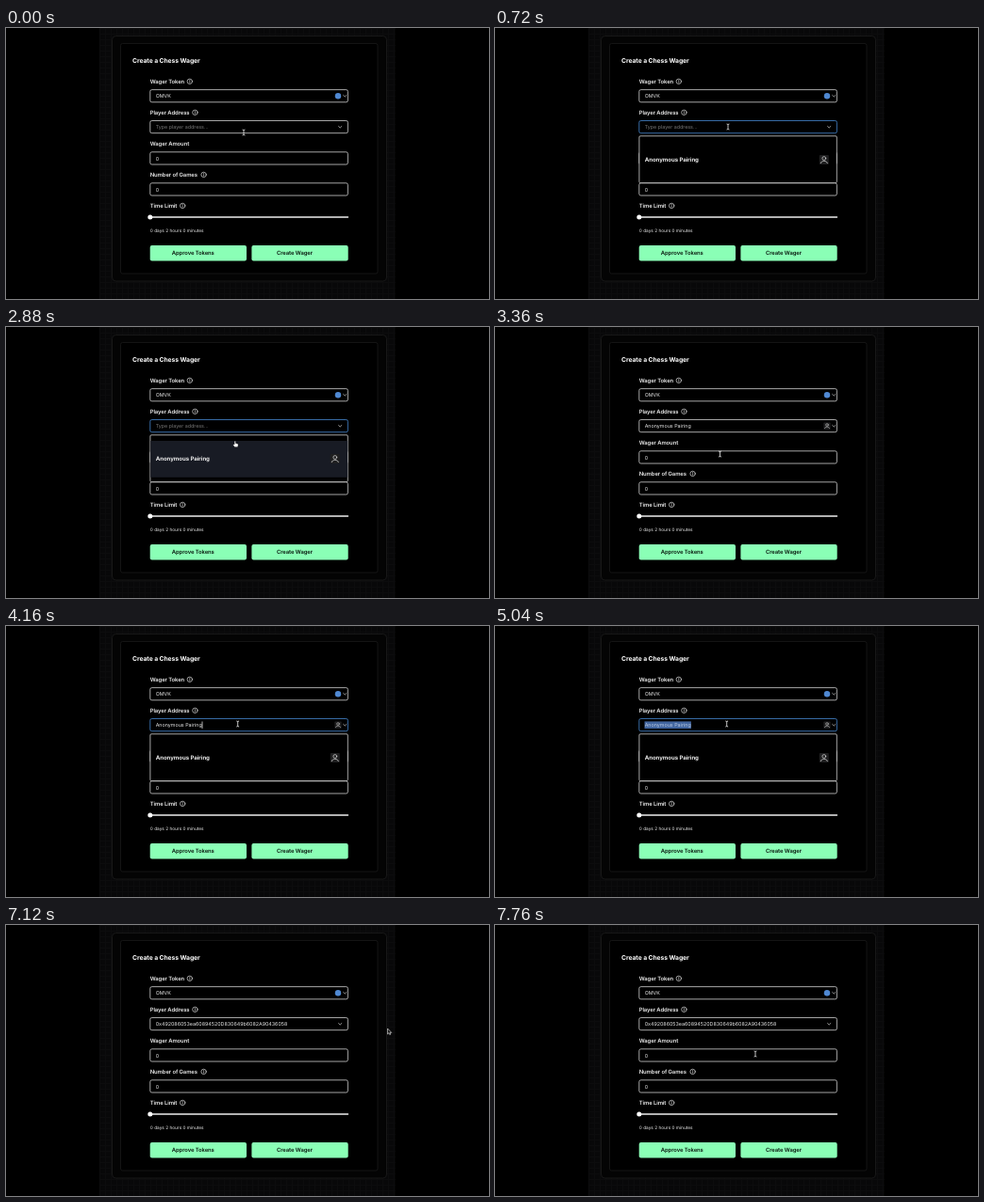
An HTML page for the animation above (7.84 s loop, 512 px wide and 288 px high).

```html
<!DOCTYPE html>
<html lang="en">
<head>
<meta charset="utf-8">
<title>Create a Chess Wager</title>
<style>
  html, body { margin: 0; width: 100%; height: 100%; overflow: hidden; background: #000; }
  svg { display: block; width: 512px; height: 288px; }
  text { font-family: Inter, "Noto Sans", sans-serif; font-size: 5.35px; fill: #ececec; text-rendering: geometricPrecision; }
  .title { font-size: 6.75px; font-weight: 700; letter-spacing: -.01em; fill: #fff; }
  .label { font-size: 5.9px; font-weight: 600; letter-spacing: -.015em; }
  .option { font-size: 6.1px; font-weight: 700; letter-spacing: -.01em; }
  .small { font-size: 4.75px; }
  .button { font-size: 5.9px; font-weight: 600; letter-spacing: -.015em; fill: #0a1a10; text-anchor: middle; }
  .field { fill: #000; stroke: #dcdcdc; stroke-width: .75; }
  .line { fill: none; stroke: #ddd; stroke-width: .7; stroke-linecap: round; stroke-linejoin: round; }
</style>
</head>
<body>
<svg viewBox="0 0 512 288">
  <defs>
    <pattern id="grid" width="6" height="6" x="99" patternUnits="userSpaceOnUse">
      <path d="M0 .5H6M.5 0V6" stroke="#0c0c0d"/>
    </pattern>
    <g id="info" class="line">
      <circle r="2.7"/>
      <path d="M0 -.2V1.3M0 -1.4V-1.3"/>
    </g>
    <path id="chevron" class="line" d="M-1.6 -.7L0 .8L1.6 -.7"/>
    <g id="user">
      <rect x="-5" y="-5" width="10" height="10" rx="1" fill="#1f1f20"/>
      <circle class="line" cy="-1.6" r="1.9"/>
      <path class="line" d="M-3.6 3.6C-3.2 .4 3.2 .4 3.6 3.6"/>
    </g>
  </defs>

  <rect x="99" width="313.5" height="288" fill="#080809"/>
  <rect x="99" width="313.5" height="288" fill="url(#grid)"/>
  <rect x="112.5" y="8.5" width="291" height="260.5" rx="4" fill="#040404" stroke="#181818"/>
  <rect x="121.5" y="16.5" width="272.5" height="244.5" rx="2" fill="#000" stroke="#1a1a1a" stroke-width=".8"/>

  <text class="title" x="134" y="36.8">Create a Chess Wager</text>
  <text class="label" x="152.7" y="59.1">Wager Token</text>
  <text class="label" x="152.7" y="92.1">Player Address</text>
  <text class="label" x="152.7" y="125.2">Wager Amount</text>
  <text class="label" x="152.7" y="158.2">Number of Games</text>
  <text class="label" x="152.7" y="191.2">Time Limit</text>
  <use href="#info" x="194.8" y="56.8"/>
  <use href="#info" x="200.4" y="89.8"/>
  <use href="#info" x="209.6" y="155.9"/>
  <use href="#info" x="187.2" y="188.9"/>

  <rect class="field" x="152.8" y="65.6" width="209.6" height="13.2" rx="1.8"/>
  <rect class="field" x="152.8" y="98.5" width="209.6" height="13.2" rx="1.8" id="player"/>
  <rect class="field" x="152.8" y="131.8" width="209.6" height="13.2" rx="1.8"/>
  <rect class="field" x="152.8" y="164.8" width="209.6" height="13.2" rx="1.8"/>
  <text x="158.7" y="74.1">OMVK</text>
  <circle cx="352" cy="72.2" r="3.2" fill="#4f88d2"/>
  <use href="#chevron" x="359.3" y="72.2"/>
  <text x="158.7" y="140.5">0</text>
  <text x="158.7" y="173.5">0</text>

  <rect id="selection" x="158.5" y="101.4" height="7.6" fill="#41659f"/>
  <text id="value" x="158.7" y="107.1"></text>
  <path id="caret" stroke="#fff" stroke-width=".7"/>
  <use id="avatar" href="#user" transform="translate(352 105.2) scale(.72)"/>
  <use id="arrow" href="#chevron" y="105.2"/>

  <path d="M153 201H362.5" stroke="#eee" stroke-width="1.4" stroke-linecap="round"/>
  <circle cx="152.8" cy="201" r="2.5" fill="#fff"/>
  <text class="small" x="152.8" y="217.4">0 days 2 hours 0 minutes</text>
  <g fill="#8affb6">
    <rect x="152.7" y="231" width="102.3" height="16.6" rx="2"/>
    <rect x="260.4" y="231" width="102.3" height="16.6" rx="2"/>
  </g>
  <text class="button" x="198.3" y="241.4">Approve Tokens</text>
  <text class="button" x="306" y="241.4">Create Wager</text>

  <rect id="menu" class="field" x="152.9" y="114.8" width="209.4" rx="1.2"/>
  <g id="option">
    <rect id="hover" x="153.2" y="121" width="208.9" height="38.8" fill="#181b24"/>
    <text class="option" x="158.7" y="142.2">Anonymous Pairing</text>
    <use href="#user" x="348.8" y="140.1"/>
  </g>

  <g id="pointer">
    <path id="beam" d="M-1.4 -3Q0 -3 0 -2V2Q0 3 -1.4 3M1.4 -3Q0 -3 0 -2M0 2Q0 3 1.4 3" fill="none" stroke="#eee" stroke-width=".8"/>
    <path id="hand" d="M-1.3 -3Q-.6 -3.6 -.1 -2.9V-.9L2.1 -.3Q2.8 0 2.6 1L2 3H-1.1L-2.8 .7Q-2.7 -.1 -1.3 .4Z" fill="#fff" stroke="#222" stroke-width=".3"/>
    <path id="tip" d="M-1.5 -3V3L-.1 1.7L.8 3.6L1.7 3.2L.9 1.4H2.7Z" fill="#111" stroke="#eee" stroke-width=".6"/>
  </g>
</svg>
<script>
const LOOP = 7840, STEP = 80;
const PLACEHOLDER = "Type player address...";
const ADDRESS = "0x492086053ea60894520D830649b6082A90436058";
const ANON = "Anonymous Pairing";

// Start time, field value, focused, selected
const states = [
  [0, "", false, false],
  [160, "", true, false],
  [1120, ADDRESS, true, false],
  [2000, ADDRESS, true, true],
  [2320, "", true, false],
  [3120, ANON, false, false],
  [4160, ANON, true, false],
  [4880, ANON, true, true],
  [5120, "", true, false],
  [5680, ADDRESS, true, false],
  [7120, ADDRESS, false, false]
];

// Time, x, y of the mouse pointer
const path = [
  [0, 252, 111], [400, 247, 105], [2720, 247, 105], [2880, 243.5, 124.5],
  [3040, 242, 128], [3360, 238.5, 135], [3600, 238.5, 135], [4080, 245.7, 104],
  [5920, 245.7, 104], [6160, 259, 104.5], [6800, 259, 104.5], [7120, 406, 113],
  [7360, 378, 117], [7440, 377, 118], [7760, 276, 137], [LOOP, 276, 137]
];

const $ = id => document.getElementById(id);
const show = (id, on) => $(id).style.display = on ? "" : "none";

function pointerAt(t) {
  const i = path.findIndex(k => k[0] > t);
  const [t0, x0, y0] = path[i - 1], [t1, x1, y1] = path[i];
  const u = (t - t0) / (t1 - t0), e = u * u * (3 - 2 * u);
  return [x0 + (x1 - x0) * e, y0 + (y1 - y0) * e];
}

function render(t) {
  const [start, value, focused, selected] = states.findLast(s => s[0] <= t);
  const [x, y] = pointerAt(t);
  const matches = value !== ADDRESS;
  const text = $("value");
  text.textContent = value || PLACEHOLDER;
  text.style.fill = selected ? "#bccbe4" : value ? "" : "#777";
  const width = value ? text.getComputedTextLength() : 0;

  $("player").style.stroke = focused ? "#4a8fdc" : "";
  $("selection").setAttribute("width", width + .4);
  show("selection", selected);
  $("caret").setAttribute("d", `M${159 + width} 101.5V109`);
  show("caret", focused && !selected && Math.floor((t - start) / 520) % 2 === 0);
  show("avatar", value === ANON);
  $("arrow").setAttribute("x", value === ANON ? 359.3 : 354.2);

  const hovering = focused && matches && y >= 120;
  show("menu", focused);
  $("menu").setAttribute("height", matches ? 49.8 : 6.5);
  show("option", focused && matches);
  show("hover", hovering);

  const overField = x < 362 && (y > 98 && y < 112 || y > 132 && y < 145);
  $("pointer").setAttribute("transform", `translate(${x} ${y})`);
  show("hand", hovering);
  show("beam", !hovering && overField);
  show("tip", !hovering && !overField);
}

const origin = performance.now();
function tick() {
  const t = (performance.now() - origin) % LOOP;
  render(Math.floor(t / STEP) * STEP);
  requestAnimationFrame(tick);
}
tick();
</script>
</body>
</html>
```
